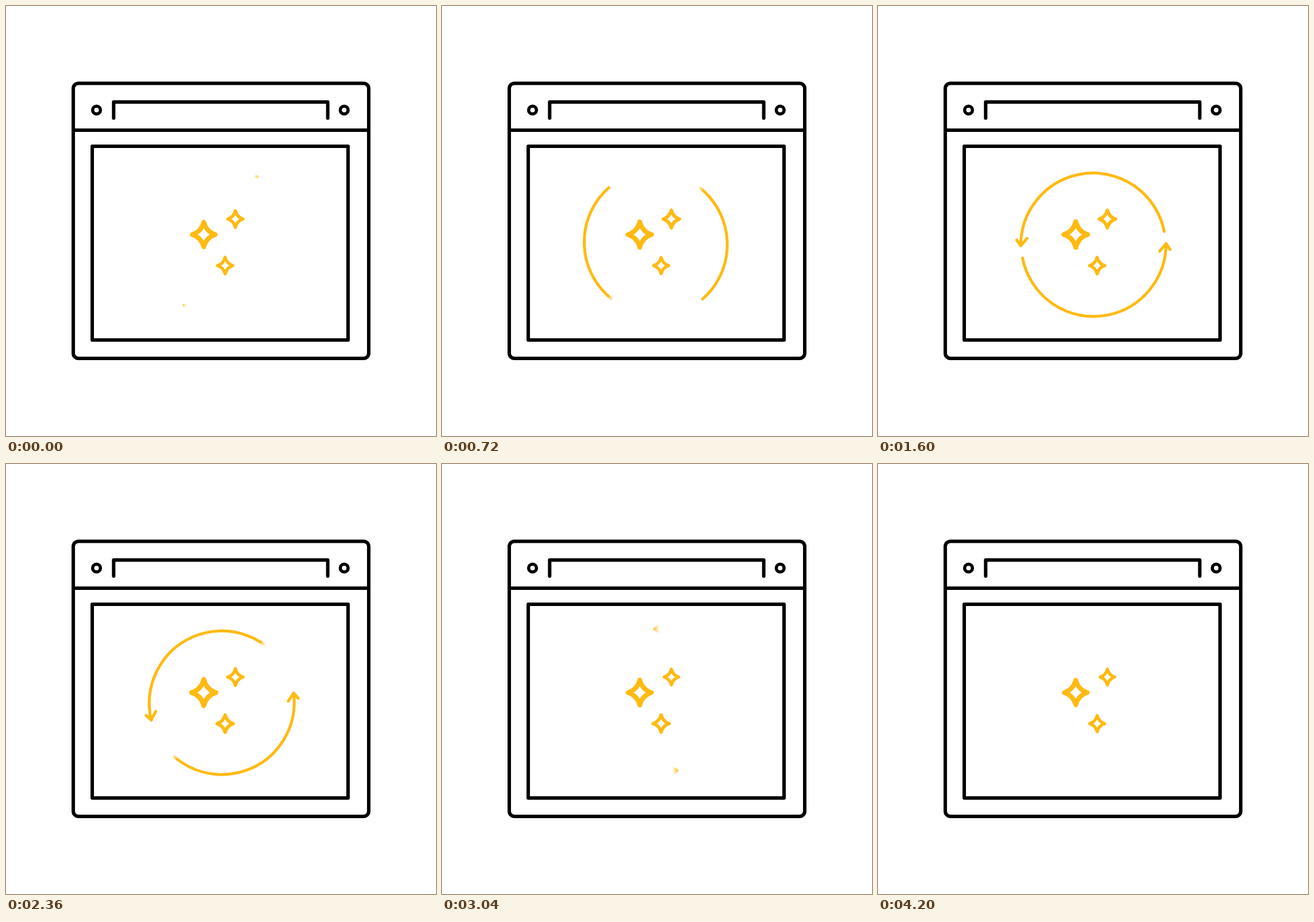
Recreate the animation shown at these times as an HTML page with a canvas. Size 748 by 748 pixels, loop 8000 ms.

```html
<!DOCTYPE html>
<html lang="en">
<head>
<meta charset="utf-8">
<title>Oven cleaning cycle</title>
<style>
  html, body { margin: 0; width: 100%; height: 100%; overflow: hidden; background: #fff; }
  canvas { display: block; width: 100vmin; height: 100vmin; }
</style>
</head>
<body>
<canvas id="stage" width="748" height="748"></canvas>
<script>
const ctx = document.getElementById('stage').getContext('2d');
const LOOP = 8000, STEP = 40, RAD = Math.PI / 180;
const GOLD = '255,186,18';
const TAIL = 11.2, HEAD = 180.3, RADIUS = 126, FEATHER = 2.5;

// pivot, resting offset of the arc centre, half turn, delay of the way out
const arrows = [
  { px: 373.7, py: 412.3, dx: 0.6, dy: 4.3, turn: 0, lag: 0 },
  { px: 377, py: 410.9, dx: -2, dy: 3.1, turn: 180, lag: 75 }
];

// centre, tip distances, line width, growth, phase of the largest size
const stars = [
  { x: 344, y: 397.6, rx: 20, ry: 21.5, w: 8, grow: 0.06, peak: 0.5 },
  { x: 399, y: 370.6, rx: 12.6, ry: 13.8, w: 5.4, grow: 0.11, peak: 0.72 },
  { x: 381.2, y: 451.6, rx: 13, ry: 14.1, w: 5.4, grow: 0.09, peak: 0.33 }
];

const clamp = u => Math.min(1, Math.max(0, u));
function ease(t, start, length) {
  const u = clamp((t - start) / length);
  return u * u * (3 - 2 * u);
}

function line(...points) {
  ctx.beginPath();
  for (let i = 0; i < points.length; i += 2) ctx.lineTo(points[i], points[i + 1]);
  ctx.stroke();
}

function drawOven() {
  ctx.strokeStyle = '#000';
  ctx.lineWidth = 6;
  ctx.beginPath();
  ctx.roundRect(117, 134.5, 514, 478.5, 9);
  ctx.rect(150, 244, 445, 337);
  ctx.stroke();
  line(117, 216, 631, 216);
  line(187.3, 195, 187.3, 167, 559.7, 167, 559.7, 195);
  ctx.lineWidth = 5.6;
  for (const x of [157.5, 588.3]) {
    ctx.beginPath();
    ctx.arc(x, 181, 6.8, 0, 7);
    ctx.stroke();
  }
}

function drawStar(s, t) {
  const fade = 1 - clamp((t - 3400) / 800);
  const wave = (1 + Math.cos(2 * Math.PI * (t / 960 - s.peak))) / 2;
  const k = 1 + s.grow * wave * fade;
  const { rx, ry } = s, cx = rx * 0.22, cy = ry * 0.22;
  ctx.save();
  ctx.translate(s.x, s.y);
  ctx.scale(k, k);
  ctx.strokeStyle = `rgb(${GOLD})`;
  ctx.lineWidth = s.w;
  ctx.beginPath();
  ctx.moveTo(0, -ry);
  ctx.quadraticCurveTo(cx, -cy, rx, 0);
  ctx.quadraticCurveTo(cx, cy, 0, ry);
  ctx.quadraticCurveTo(-cx, cy, -rx, 0);
  ctx.quadraticCurveTo(-cx, -cy, 0, -ry);
  ctx.closePath();
  ctx.stroke();
  ctx.restore();
}

// Soft-edged window along the arc, in degrees from the tail
function wipe(from, to) {
  const lead = 60;
  const g = ctx.createConicGradient((TAIL - lead) * RAD, 0, 0);
  const stop = (deg, alpha) => g.addColorStop((lead + deg) / 360, `rgba(${GOLD},${alpha})`);
  stop(from - FEATHER, 0);
  stop(from + FEATHER, 1);
  stop(to - FEATHER, 1);
  stop(to + FEATHER, 0);
  return g;
}

function drawArrow(a, t) {
  const angle = -130 + 130 * ease(t, 0, 1370) + 130 * ease(t, 2100 + a.lag, 1320);
  const shown = 185 * ease(t, 0, 1370);
  const hidden = 185 * ease(t, 2040, 1230);
  ctx.save();
  ctx.translate(a.px, a.py);
  ctx.scale(1, -1);
  ctx.rotate(angle * RAD);
  ctx.translate(a.dx, -a.dy);
  ctx.rotate(a.turn * RAD);
  ctx.strokeStyle = t < 2000 ? wipe(-20, shown) : wipe(hidden > 0 ? hidden - 4 * (1 - clamp(hidden / 8)) : -20, 200);
  ctx.lineWidth = 5;
  ctx.beginPath();
  ctx.arc(0, 0, RADIUS, TAIL * RAD, HEAD * RAD);
  ctx.moveTo(-133, 9.5);
  ctx.lineTo(-RADIUS, -0.5);
  ctx.lineTo(-115, 12.5);
  ctx.stroke();
  ctx.restore();
}

function draw(now) {
  const t = Math.floor((now % LOOP) / STEP) * STEP;
  ctx.fillStyle = '#fff';
  ctx.fillRect(0, 0, 748, 748);
  ctx.lineCap = ctx.lineJoin = 'round';
  drawOven();
  if (t < 3300) arrows.forEach(a => drawArrow(a, t));
  stars.forEach(s => drawStar(s, t));
}

let start;
function tick(now) {
  start ??= now;
  draw(now - start);
  requestAnimationFrame(tick);
}
draw(0);
requestAnimationFrame(tick);
</script>
</body>
</html>
```
